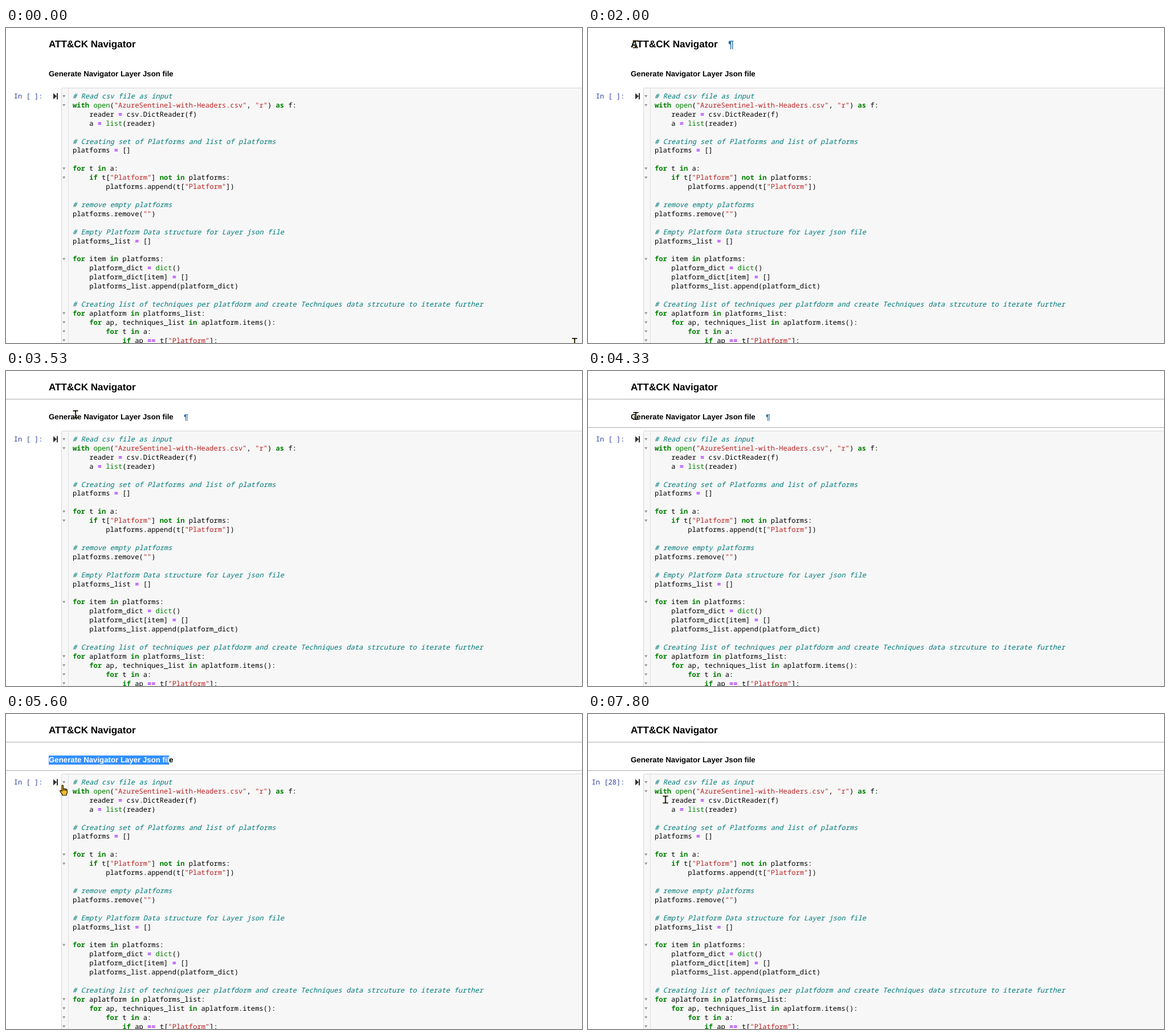
Write an HTML page that moves like this. It is 1011 px wide and 554 px high and loops after 8000 ms.

```html
<!DOCTYPE html>
<html lang="en">
<head>
<meta charset="utf-8">
<title>Notebook</title>
<style>
  html, body { margin: 0; width: 100%; height: 100%; overflow: hidden; background: #fff; }
  svg { display: block; width: 1011px; height: 554px; }
  text { white-space: pre; text-rendering: geometricPrecision; }
  .mono { font: 12.14px "Noto Sans Mono", "DejaVu Sans Mono", monospace; }
  .head { font-family: "Liberation Sans", Arial, sans-serif; font-weight: bold; }
  .comment { fill: #007979; font-style: italic; }
  .string { fill: #ba2121; }
  .keyword { fill: #008000; font-weight: bold; }
  .builtin { fill: #008000; }
  .operator { fill: #aa22ff; font-weight: bold; }
  .prompt { fill: #303f9f; }
  .mark { fill: #296eaa; }
</style>
</head>
<body>
<svg id="stage" viewBox="0 0 1011 554">
  <rect x="97.5" y="105.5" width="930" height="480" rx="2" fill="#f7f7f7" stroke="#d6d6d6"/>
  <path d="M109.5 106V554" stroke="#e0e0e0"/>
  <path d="M83 114.5L89 120L83 125.5ZM89 114.5h2v11h-2Z" fill="#333"/>
  <path id="topRule" d="M0 49.5H1011" stroke="#ababab"/>
  <path id="bottomRule" d="M0 99.5H1011" stroke="#ababab"/>
  <text id="prompt" class="mono prompt" x="64.6" y="124" text-anchor="end"></text>
  <g id="content"></g>
  <g id="pointer">
    <g id="beam" fill="none">
      <path d="M-4.5 -6H-1L0 -5L1 -6H4.5M-4.5 6H-1L0 5L1 6H4.5M0 -5V5" stroke="#111" stroke-width="2.2"/>
      <path d="M-3.5 -6H-1M1 -6H3.5M0 -4V4M-3.5 6H-1M1 6H3.5" stroke="#b98a2c" stroke-width=".7"/>
    </g>
    <path id="hand" fill="#f2bd2f" stroke="#1c1608" stroke-width="1.2" stroke-linejoin="round"
      d="M-3 2V-7.6Q-3 -9 -1.8 -9T-.5 -7.6V-2.5Q1 -3.6 2 -2.2Q3.6 -3 4.4 -1.5Q6.4 -2 6.4 .5V4Q6.4 6 5 7.4V9H-2.2V7.4L-5.8 2.6Q-6.8 .8 -5.4 .4Q-4.4 0 -3 2ZM-.5 -2.5V1M2 -2V1M4.4 -1.3V1.3"/>
  </g>
</svg>
<script>
const SVG = "http://www.w3.org/2000/svg";
const LOOP = 8000, STEP = 1000 / 15;
const CHAR = 7.284, LINE = 15.91, CODE_X = 117, CODE_Y = 124;
const $ = id => document.getElementById(id);

const code = `# Read csv file as input
with open("AzureSentinel-with-Headers.csv", "r") as f:
    reader = csv.DictReader(f)
    a = list(reader)

# Creating set of Platforms and list of platforms
platforms = []

for t in a:
    if t["Platform"] not in platforms:
        platforms.append(t["Platform"])

# remove empty platforms
platforms.remove("")

# Empty Platform Data structure for Layer json file
platforms_list = []

for item in platforms:
    platform_dict = dict()
    platform_dict[item] = []
    platforms_list.append(platform_dict)

# Creating list of techniques per platfdorm and create Techniques data strcuture to iterate further
for aplatform in platforms_list:
    for ap, techniques_list in aplatform.items():
        for t in a:
            if ap == t["Platform"]:`;

const token = /(?<comment>#.*)|(?<string>"[^"]*")|\b(?<keyword>for|in|if|not|with|as)\b|\b(?<builtin>open|list|dict)\b|(?<operator>==?)/g;

function add(tag, attrs, text = "", parent = $("content")) {
  const el = document.createElementNS(SVG, tag);
  for (const key in attrs) el.setAttribute(key, attrs[key]);
  el.textContent = text;
  return parent.appendChild(el);
}

function addLine(line, row) {
  const source = line.trimStart(), y = CODE_Y + row * LINE;
  const el = add("text", { class: "mono", x: CODE_X + (line.length - source.length) * CHAR, y });
  let end = 0;
  for (const match of source.matchAll(token)) {
    const kind = Object.keys(match.groups).find(key => match.groups[key]);
    add("tspan", {}, source.slice(end, match.index), el);
    add("tspan", { class: kind }, match[0], el);
    end = match.index + match[0].length;
  }
  add("tspan", {}, source.slice(end), el);
  if (/^(for|if|with)/.test(source) || row === 0)
    add("path", { d: `M99 ${y - 6}h5.4l-2.7 4.2Z`, fill: "#999" });
}
code.split("\n").forEach(addLine);

function addHeading(label, size, y, markX, top, height) {
  const style = { class: "head", "font-size": size, x: 75, y };
  const base = add("text", style, label);
  const box = add("rect", { x: 75, y: top, height, width: 0, fill: "#3390ff" });
  const white = add("text", { ...style, fill: "#fff" });
  const mark = add("text", { class: "head mark", "font-size": size * 1.07, x: markX, y: y + .7 }, "¶");
  const edge = n => n ? base.getSubStringLength(0, n) : 0;
  return {
    select(x) {
      let n = 0;
      while (n < label.length && 75 + (edge(n) + edge(n + 1)) / 2 < x) n++;
      box.setAttribute("width", edge(n));
      white.textContent = label.slice(0, n);
    },
    hover(on) { show(mark, on); }
  };
}
const title = addHeading("ATT&CK Navigator", 17.1, 34, 246, 19, 19);
const subtitle = addHeading("Generate Navigator Layer Json file", 13.25, 85.2, 312, 73, 16);

// Pointer stops: step, x, y
const stops = [
  [0, 998, 552], [3, 898, 525], [7, 898, 525], [10, 480, 300], [13, 266, 173],
  [15, 266, 173], [18, 213, 111], [21, 165, 74], [24, 112, 42], [28, 85.5, 29],
  [32, 81, 28], [35, 81, 28], [39, 190, 30], [42, 220, 30], [44, 251, 31], [47, 251, 31],
  [53, 122, 76], [54, 122, 76], [62, 88, 80], [64, 88, 80], [65, 84, 79],
  [66, 78, 79], [75, 289, 85], [78, 289, 85], [84, 101, 134], [89, 86, 137],
  [95, 86, 137], [96, 85, 123], [108, 85, 123], [117, 136, 150.5], [120, 136, 150.5]
];

function pointerAt(step) {
  const i = Math.max(1, stops.findIndex(stop => stop[0] >= step));
  const [s0, x0, y0] = stops[i - 1], [s1, x1, y1] = stops[i];
  const k = (step - s0) / (s1 - s0);
  return { x: x0 + (x1 - x0) * k, y: y0 + (y1 - y0) * k };
}

function show(el, on) { el.style.display = on ? "" : "none"; }

// The selected text trails the pointer by one step.
function dragX(step, from, last, until) {
  return step >= from && step < until ? pointerAt(Math.min(step - 1, last)).x : 0;
}

function render(time) {
  const step = Math.floor((time % LOOP + 4) / STEP) % 120;
  const { x, y } = pointerAt(step);
  const overButton = x < 110 && y > 105;

  $("pointer").setAttribute("transform", `translate(${x} ${y})`);
  show($("hand"), overButton);
  show($("beam"), !overButton);

  title.hover(y < 44);
  subtitle.hover(y > 70 && y < 93);
  title.select(dragX(step, 36, 44, 48));
  subtitle.select(dragX(step, 66, 75, 98));

  show($("topRule"), step >= 48);
  show($("bottomRule"), step >= 61);
  $("prompt").textContent = `In [${step < 100 ? " " : step < 109 ? "*" : "28"}]:`;
}

const start = performance.now();
function tick() {
  render(performance.now() - start);
  requestAnimationFrame(tick);
}
tick();
</script>
</body>
</html>
```
